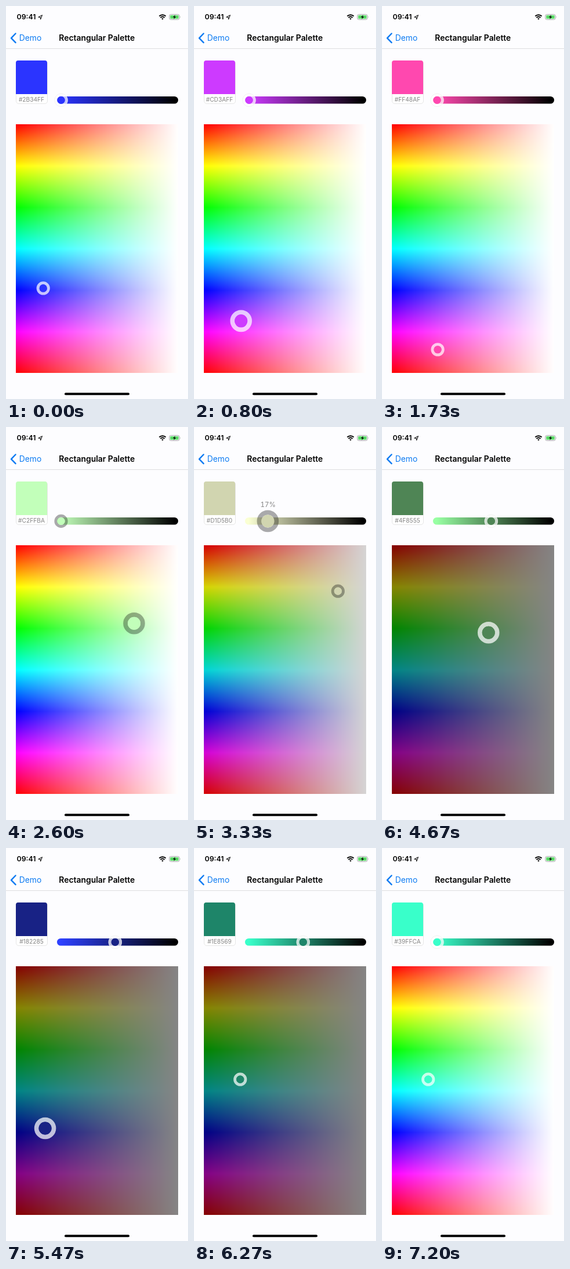
Recreate the animation shown at these times as an HTML page with a canvas. Size 314 px wide and 678 px high, loop 7270 ms.

```html
<!DOCTYPE html>
<html lang="en">
<head>
<meta charset="utf-8">
<title>Rectangular Palette</title>
<style>
  html, body { margin: 0; width: 100%; height: 100%; overflow: hidden; background: #fdfdff; }
  #stage { position: relative; width: 314px; height: 678px; overflow: hidden; font-family: Inter, sans-serif; }
  #stage > * { position: absolute; }
  svg, canvas { left: 0; top: 0; }
  .text { white-space: nowrap; line-height: 20px; transform: translateX(-50%); }
  #clock { left: 35px; top: 9px; font-size: 12.3px; font-weight: 600; }
  #back { left: 42px; top: 45px; font-size: 13.8px; color: #0d7bf2; }
  #title { left: 156.8px; top: 45px; font-size: 13.9px; font-weight: 600; }
  #card { box-sizing: border-box; left: 16.5px; top: 93.5px; width: 55px; height: 75.5px;
    border: 1px solid #e6e6e6; border-radius: 5px; background: #fff; }
  #swatch { left: 17px; top: 94px; width: 54px; height: 58px; border-radius: 4px 4px 0 0; }
  #hex { left: 44px; top: 150.5px; font-size: 10.2px; color: #858585; }
  #percent { top: 124px; font-size: 11.6px; color: #858585; font-variant-numeric: tabular-nums; }
</style>
</head>
<body>
<div id="stage">
  <canvas id="view" width="314" height="678"></canvas>
  <svg width="314" height="678" fill="none">
    <path d="M0 73.5H314" stroke="#dedee0"/>
    <path d="M16.5 47.5L9 55.3L16.5 63.1" stroke="#0d7bf2" stroke-width="2.5" stroke-linecap="round" stroke-linejoin="round"/>
    <path d="M62.5 15.8L55.8 19.2L59.2 19.6L59.6 23Z" stroke="#222" stroke-width="1.1" stroke-linejoin="round"/>
    <g stroke="#000" stroke-width="1.9">
      <path d="M264.3 17.6Q270 12.8 275.7 17.6M266.4 20.1Q270 17 273.6 20.1"/>
      <path d="M268.2 21.8Q270 20.3 271.8 21.8L270 23.8Z" fill="#000" stroke="none"/>
    </g>
    <rect x="281.9" y="14.5" width="17.2" height="9" rx="2.6" stroke="#a5a5a8"/>
    <rect x="283.3" y="15.9" width="14.4" height="6.2" rx="1.4" fill="#5bdb68"/>
    <path d="M300.2 17.3Q301.6 19 300.2 20.7Z" fill="#a5a5a8"/>
    <path d="M292 15.2L287.6 19.6H290.2L289.2 22.8L293.6 18.4H291Z" fill="#111"/>
    <rect x="101" y="667.3" width="112" height="4" rx="2" fill="#000"/>
  </svg>
  <div id="clock" class="text">09:41</div>
  <div id="back" class="text">Demo</div>
  <div id="title" class="text">Rectangular Palette</div>
  <div id="card"></div>
  <div id="swatch"></div>
  <div id="hex" class="text"></div>
  <div id="percent" class="text"></div>
</div>
<script>
const LOOP = 7270, STEP = 200 / 3;
const PAL = { x: 17, y: 204, w: 280, h: 429 };
const BAR = { x: 88, y: 156, w: 209, h: 12.6, mid: 162.4 };
const $ = id => document.getElementById(id);
const ctx = $('view').getContext('2d');
const clamp = v => Math.max(0, Math.min(1, v));

// [time, hue, saturation] of the picked colour
const PICK = [
  [0, 237.453, .8314], [90, 237.453, .8314], [1450, 326.23, .7176],
  [1790, 326.23, .7176], [2900, 66.45, .1737], [4130, 66.45, .1737],
  [5460, 234.5, .8195], [5480, 234.5, .8195], [6060, 163.8, .776], [LOOP, 163.8, .776]
];
// [time, brightness]
const LEVEL = [[0, 1], [3200, 1], [3333.4, .834], [3799, .5216], [6290, .5216], [6960, 1], [LOOP, 1]];
// [start, end] of each touch
const PALETTE_TOUCH = [[70, 1470], [1770, 2900], [4070, 6070]];
const BAR_TOUCH = [[3200, 3880], [6280, 6980]];

function track(keys, t) {
  let i = 1;
  while (i < keys.length - 1 && keys[i][0] < t) i++;
  const a = keys[i - 1], b = keys[i];
  const u = clamp((t - a[0]) / (b[0] - a[0])), k = u * u * (3 - 2 * u);
  return a.slice(1).map((v, n) => v + (b[n + 1] - v) * k);
}

const press = (touches, t) => Math.max(...touches.map(([from, to]) =>
  Math.min(clamp((t - from) / 130), clamp(1 - (t - to) / 150))));

const css = c => `rgb(${c.join()})`;

function hsv(h, s, v) {
  return [5, 3, 1].map(n => {
    const k = (n + h / 60) % 6;
    return Math.round(255 * v * (1 - s * clamp(Math.min(k, 4 - k))));
  });
}

const pixels = ctx.createImageData(PAL.w, PAL.h);
let painted = -1;
function paintPalette(v) {
  if (v === painted) return;
  painted = v;
  let p = 0;
  for (let y = 0; y < PAL.h; y++) {
    const pure = hsv(y / PAL.h * 360, 1, 1);
    for (let x = 0; x < PAL.w; x++) {
      const s = 1 - x / PAL.w;
      for (const c of pure) pixels.data[p++] = v * (255 - s * (255 - c));
      pixels.data[p++] = 255;
    }
  }
}

function paintBar(h, s) {
  const fill = ctx.createLinearGradient(BAR.x + 6, 0, BAR.x + BAR.w - 6, 0);
  fill.addColorStop(0, css(hsv(h, s, 1)));
  fill.addColorStop(1, '#000');
  ctx.fillStyle = fill;
  ctx.beginPath();
  ctx.roundRect(BAR.x, BAR.y, BAR.w, BAR.h, BAR.h / 2);
  ctx.fill();
}

function paintThumb(x, y, grow, color, dark, outline) {
  const outer = 11.6 + 7.2 * grow, inner = 6.6 + 4.4 * grow;
  const ring = (r, width, style) => {
    ctx.beginPath();
    ctx.arc(x, y, r, 0, 2 * Math.PI);
    ctx.lineWidth = width;
    ctx.strokeStyle = style;
    ctx.stroke();
  };
  ring((outer + inner) / 2, outer - inner, dark ? 'rgba(0,0,0,.33)' : 'rgba(255,255,255,.72)');
  if (outline && !dark) ring(outer - .4, .8, '#ececec');
  ctx.beginPath();
  ctx.arc(x, y, inner, 0, 2 * Math.PI);
  ctx.fillStyle = color;
  ctx.fill();
}

function draw(time) {
  const t = Math.floor((time % LOOP + 4) / STEP) * STEP;
  const [h, s] = track(PICK, t), [v] = track(LEVEL, t);
  const rgb = hsv(h, s, v), color = css(rgb);
  const dark = (1 - s) * v > .65;
  const held = press(BAR_TOUCH, t), barX = 95 + 195 * (1 - v);

  ctx.clearRect(0, 0, 314, 678);
  paintPalette(v);
  ctx.putImageData(pixels, PAL.x, PAL.y);
  paintBar(h, s);
  paintThumb(barX, BAR.mid, held, color, dark, true);
  paintThumb(PAL.x + PAL.w * (1 - s), PAL.y + PAL.h * h / 360, press(PALETTE_TOUCH, t), color, dark);

  $('swatch').style.background = color;
  $('hex').textContent = '#' + rgb.map(c => c.toString(16).padStart(2, '0')).join('').toUpperCase();
  $('percent').textContent = Math.round((1 - v) * 100) + '%';
  $('percent').style.left = barX + .3 + 'px';
  $('percent').style.opacity = held;
}

const start = performance.now();
(function frame() {
  draw(performance.now() - start);
  requestAnimationFrame(frame);
})();
</script>
</body>
</html>
```
